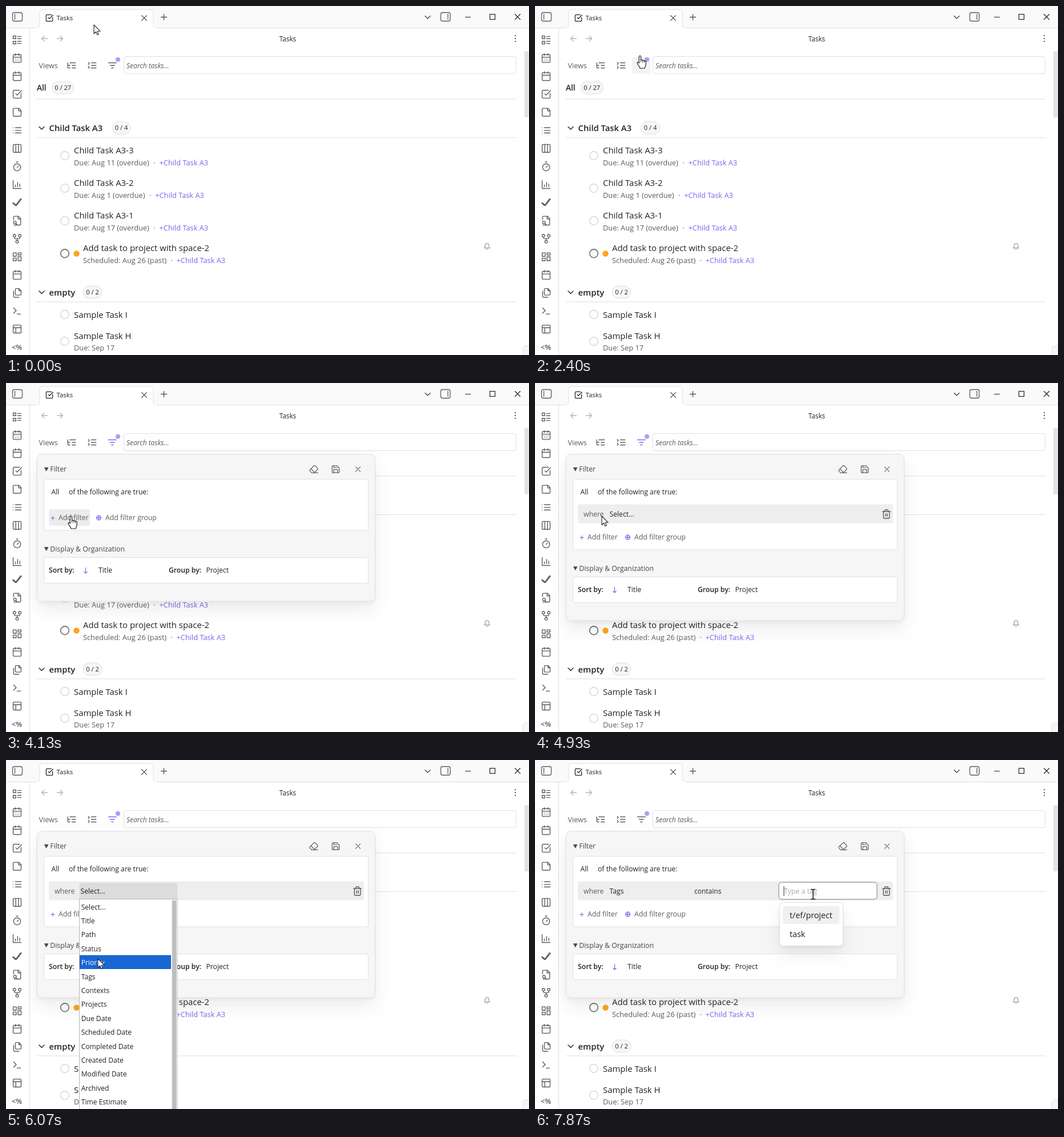
These frames come from a looping animation (916 by 611 pixels, 8000 ms). An HTML page:

```html
<!DOCTYPE html>
<html lang="en">
<head>
<meta charset="utf-8">
<title>Tasks</title>
<style>
  html, body { margin: 0; width: 100%; height: 100%; overflow: hidden; background: #fff; }
  svg { display: block; width: 100vw; height: 100vh; font-family: "Open Sans", "Noto Sans", sans-serif; }
  text { white-space: pre; }
</style>
</head>
<body>
<svg id="stage" viewBox="0 0 916 611"></svg>
<script>
const INK = '#222', SOFT = '#5c5c5c', LINE = '#e0e0e0', PURPLE = '#8560f0';

// Text placed by its left edge and the middle of its capitals
const text = (x, mid, str, size = 12.2, fill = INK, weight = 400, more = '') =>
  `<text x="${x}" y="${mid + size * .36}" font-size="${size}" fill="${fill}" font-weight="${weight}" ${more}>` +
  str.replace(/&/g, '&amp;').replace(/</g, '&lt;') + '</text>';
const rect = (x, y, w, h, r, fill, stroke = 'none', more = '') =>
  `<rect x="${x}" y="${y}" width="${w}" height="${h}" rx="${r}" fill="${fill}" stroke="${stroke}" ${more}/>`;
const disc = (x, y, r, fill, stroke = 'none', width = 1) =>
  `<circle cx="${x}" cy="${y}" r="${r}" fill="${fill}" stroke="${stroke}" stroke-width="${width}"/>`;
const path = (d, stroke, width = 1, fill = 'none') =>
  `<path d="${d}" stroke="${stroke}" stroke-width="${width}" fill="${fill}" stroke-linecap="round" stroke-linejoin="round"/>`;
const rule = (y, x = 54, end = 894) => rect(x, y, end - x, 1, 0, LINE);
const group = (id, body, more = '') => `<g id="${id}" ${more}>${body}</g>`;

// Icons live on a 24 unit grid
const box = (x, y, w, h) => `M${x} ${y}h${w}v${h}h${-w}z`;
const ring = (x, y, r) => `M${x - r} ${y}a${r} ${r} 0 1 0 ${2 * r} 0a${r} ${r} 0 1 0 ${-2 * r} 0`;
const square = 'M5 3h14a2 2 0 0 1 2 2v14a2 2 0 0 1-2 2H5a2 2 0 0 1-2-2V5a2 2 0 0 1 2-2z';
const calendar = 'M8 2v4M16 2v4M3 10h18M5 4h14a2 2 0 0 1 2 2v14a2 2 0 0 1-2 2H5a2 2 0 0 1-2-2V6a2 2 0 0 1 2-2z';
const checkbox = 'M21 10.5V19a2 2 0 0 1-2 2H5a2 2 0 0 1-2-2V5a2 2 0 0 1 2-2h12.5M9 11l3 3L22 4';
const cross = 'M5 5l14 14M19 5L5 19';
const dots = 'M12 4v.01M12 12v.01M12 20v.01';
const icon = (d, x, y, size = 18, stroke = SOFT, width = 1.8) =>
  `<g transform="translate(${x - size / 2} ${y - size / 2}) scale(${size / 24})">${path(d, stroke, width)}</g>`;

const ribbon = [
  box(3, 3, 6, 6) + box(3, 15, 6, 6) + 'M13 4h8M13 9h8M13 15h8M13 20h8',
  calendar + 'M8 14h.01M12 14h.01M16 14h.01M8 18h.01M12 18h.01M16 18h.01',
  calendar,
  checkbox,
  'M16 3H5a2 2 0 0 0-2 2v14a2 2 0 0 0 2 2h14a2 2 0 0 0 2-2V8zM15 3v4a2 2 0 0 0 2 2h4',
  'M3 6h.01M3 12h.01M3 18h.01M8 6h13M8 12h13M8 18h13',
  square + 'M9 3v18M15 3v18',
  'M10 2h4M12 14l3-3' + ring(12, 14, 8),
  'M3 3v18h18M8 17v-4M13 17V7M18 17v-6',
  'M2 13l6 6L20 3M3 12l6 5M10 19L22 4',
  'M14 2v6h6M5 22h13a2 2 0 0 0 2-2V7l-5-5H6a2 2 0 0 0-2 2v6M9 18l3 3' + ring(7, 16, 3),
  ring(12, 19, 3) + ring(6, 5, 3) + ring(18, 5, 3) + 'M18 8v2c0 1-1 2-2 2H8c-1 0-2-1-2-2V8M12 12v4',
  box(3, 3, 7, 8) + box(14, 3, 7, 5) + box(14, 12, 7, 9) + box(3, 15, 7, 6),
  calendar,
  'M10 2h6l5 5v8a2 2 0 0 1-2 2h-9a2 2 0 0 1-2-2V4a2 2 0 0 1 2-2zM16 2v5h5M16 22H6a2 2 0 0 1-2-2V8',
  'M4 17l6-6-6-6M12 19h8',
  square + 'M3 9h18M9 21V9'
];

const pill = (x, y, w, label) =>
  rect(x + .5, y + .5, w - 1, 22, 11, '#f6f6f6', LINE) +
  text(x + w / 2, y + 11.5, label, 11.1, INK, 500, 'text-anchor="middle"');
const heading = (y, label, pillX, count) =>
  path(`M58 ${y - 2.5}l4.5 4.5 4.5-4.5`, INK, 1.4) +
  text(75.5, y, label, 14.8, INK, 600) + pill(pillX, y - 12, 34, count) + rule(y + 16);
const task = (y, title, sub, sepX, x = 119) =>
  text(x, y, title, 14.9) + text(x, y + 21, sub, 12.8, SOFT) +
  (sepX ? disc(sepX, y + 21.5, 1.3, '#bbb') + text(sepX + 8.5, y + 21, '+Child Task A3', 12.8, PURPLE) : '');
const bubble = (y, stroke = '#dedede') => disc(103, y, 7.3, '#fff', stroke, 1.8);

const frame =
  rect(0, 0, 916, 38.5, 0, '#fafafa') + rule(38, 0, 916) + rect(41, 39, 1, 572, 0, LINE) +
  path('M53 38.5q6 0 6-6V12q0-6 6-6h187q6 0 6 6v20.5q0 6 6 6', LINE, 1, '#fff') + rect(53, 38, 211, 1.5, 0, '#fff') +
  rect(11.5, 11.5, 17, 15, 3, 'none', SOFT, 'stroke-width="1.3"') + path('M15.5 14.5v9', SOFT, 1.3) +
  rect(761.5, 11.5, 16.5, 15, 3, 'none', SOFT, 'stroke-width="1.3"') + path('M774 14.5v9', SOFT, 1.3) +
  icon(checkbox, 76, 21, 15, INK, 2) + text(88.5, 21, 'Tasks', 11.4, INK) +
  icon(cross, 242, 21, 15, '#444', 2) + path('M271.5 19.5h10M276.5 14.5v10', '#555', 1.3) +
  path('M734 17.5l4.5 4.5 4.5-4.5', '#444', 1.3) + path('M804.5 19.5h9', INK, 1.2) +
  rect(847.5, 14.5, 9, 9, 0, 'none', INK, 'stroke-width="1.2"') + path('M891.5 14.5l9 9M900.5 14.5l-9 9', INK, 1.2) +
  ribbon.map((d, i) => icon(d, 19.5, 59.5 + i * 31.63, 18.5)).join('') +
  text(10, 597.5, '<%', 12.5, '#555', 600) +
  path('M72.5 57h-10M67 52.5L62.5 57l4.5 4.5M89.5 57h10M95 52.5l4.5 4.5-4.5 4.5', '#b5b5b5', 1.3) +
  text(493.5, 57.5, 'Tasks', 11.7, INK, 400, 'text-anchor="middle"') + icon(dots, 892, 57, 15, '#333', 3.4) +
  text(57.5, 104.5, 'Views', 12.6, SOFT, 500) +
  icon('M21 12h-8M21 6H8M21 18h-8M3 6v10c0 1 1 2 2 2h3M3 10c0 1 1 2 2 2h3', 115, 104) +
  group('list', icon('M3 10l2.5-2.5L3 5M3 19l2.5-2.5L3 14M10 6h11M10 12h11M10 18h11', 151, 104, 18, 'currentColor')) +
  rect(170, 89, 32, 29.5, 4, '#f4f4f4', 'none', 'id="filterBack"') +
  group('filter', icon('M3 6h18M7 12h10M10 18h4', 186.3, 104, 18, 'currentColor', 2)) +
  disc(196, 93.7, 4, '#b598f6') +
  rect(206.5, 88.5, 687, 30, 4, '#fff', LINE) +
  text(211, 104.5, 'Search tasks...', 12, SOFT, 400, 'font-style="italic"') +
  text(54, 143.5, 'All', 13.7, INK, 600) + pill(80, 131.5, 39.5, '0 / 27') + rule(162.5);

const tasks =
  heading(214, 'Child Task A3', 185, '0 / 4') +
  bubble(262) + task(253, 'Child Task A3-3', 'Due: Aug 11 (overdue)', 260) +
  bubble(319) + task(310, 'Child Task A3-2', 'Due: Aug 1 (overdue)', 252.7) +
  bubble(376) + task(367, 'Child Task A3-1', 'Due: Aug 17 (overdue)', 260) +
  bubble(433.3, '#777') + disc(123.5, 433.5, 5.2, '#ffa41f') +
  task(424, 'Add task to project with space-2', 'Scheduled: Aug 26 (past)', 290, 135) +
  icon('M6 8a6 6 0 0 1 12 0c0 7 3 9 3 9H3s3-2 3-9M10 21c1 1.3 3 1.3 4 0', 842.5, 421, 13, '#777') +
  group('menu', icon(dots, 878, 0, 14, '#888', 2.4)) +
  heading(501.5, 'empty', 134.5, '0 / 2') +
  bubble(540) + task(540.5, 'Sample Task I', '') +
  bubble(587) + task(577.5, 'Sample Task H', 'Due: Sep 17') +
  rect(908, 79, 7.5, 116, 2, '#e2e2e2') +
  path('M905.5 612v-11q0-6 6-6h6v17z', LINE, 1, '#f6f6f6');

const fold = (y, label) => path(`M67.5 ${y - 3}h6.5l-3.25 6z`, '#444', .6, '#444') + text(77.3, y, label, 12.3, '#444', 500);
const lower =
  rect(75, 221, 72, 29, 4, '#ececec', 'none', 'id="addBack"') +
  path('M79 236.5h6M82 233.5v6', PURPLE, 1.2) + text(92, 236, 'Add filter', 12.3, SOFT) +
  path(ring(162.5, 236, 3.9) + 'M159 236h7M162.5 232.5v7', PURPLE, 1.3) + text(174, 236, 'Add filter group', 12.3, SOFT) +
  fold(290.5, 'Display & Organization') +
  rect(66.5, 305.5, 568, 45, 4, '#fff', LINE) +
  text(75, 328, 'Sort by:', 12.2, INK, 600) +
  path('M139.5 323.5v9.5M136.8 330.3l2.7 2.7 2.7-2.7', PURPLE, 1.2) + text(162, 328, 'Title') +
  text(285, 328, 'Group by:', 12.2, INK, 600) + text(350.5, 328, 'Project');

const condition =
  rect(75, 212.5, 552, 33, 3, '#eee', 'none', 'id="rowBack"') +
  rect(128.5, 215, 172, 30, 4, '#dcdcdc', 'none', 'id="selectBack"') +
  text(85, 229.5, 'where', 12.15, SOFT) +
  group('unset', text(130.5, 229.5, 'Select...', 12.2)) + group('tags', text(130.5, 229.5, 'Tags', 12.2)) +
  group('value',
    text(279, 229.5, 'contains', 12) +
    rect(427.5, 214.5, 171, 29, 4, '#fff', '#dadada') +
    rect(427, 214, 172, 30, 5, '#fff', '#b8b8b8', 'id="focus" stroke-width="2"') +
    text(436, 230, 'Type a tag', 12.3, '#aaa') + rect(435.5, 221, 1, 17, 0, INK, 'none', 'id="caret"')) +
  icon('M3 6h18M19 6v14a2 2 0 0 1-2 2H7a2 2 0 0 1-2-2V6M8 6V4c0-1 1-2 2-2h4c1 0 2 1 2 2v2M10 11v6M14 11v6', 615.5, 229.5, 18, '#555');

const panel =
  rect(54.5, 124.5, 592, 257.5, 8, '#f6f6f6', LINE, 'id="sheet" filter="url(#shade)"') +
  fold(151, 'Filter') +
  icon('M7 21l-4.3-4.3c-1-1-1-2.4 0-3.4l9.6-9.6c1-1 2.4-1 3.4 0l5.6 5.6c1 1 1 2.4 0 3.4L13 21M22 21H7M5 11l9 9', 539, 151, 17) +
  icon('M15 3l6 6v10a2 2 0 0 1-2 2H5a2 2 0 0 1-2-2V5a2 2 0 0 1 2-2zM17 21v-8H7v8M7 3v5h8', 577.5, 151, 16.5) +
  icon(cross, 616.5, 151, 14) +
  rect(66.5, 168.5, 568, 89.5, 4, '#fff', LINE, 'id="card"') +
  text(79.5, 190.5, 'All') + text(110, 190.5, 'of the following are true:') +
  group('condition', condition) + group('lower', lower);

const fields = ['Select...', 'Title', 'Path', 'Status', 'Priority', 'Tags', 'Contexts', 'Projects', 'Due Date',
  'Scheduled Date', 'Completed Date', 'Created Date', 'Modified Date', 'Archived', 'Time Estimate'];
const TOP = 244, STEP = 24.4;
const menu =
  rect(128.5, 243.5, 171.5, 380, 0, '#fff', '#b5b5b5') + rect(289.5, 244, 10, 367, 0, '#f3f3f3') +
  rect(291, 246, 7.5, 370, 0, '#bdbdbd') +
  rect(129, TOP, 160, STEP, 0, '#1967d2', 'none', 'id="pick"') +
  fields.map((name, i) => text(131.7, 257.3 + i * STEP, name, 12.1, INK, 400, 'class="field"')).join('');

const hints =
  rect(428.5, 249.5, 111, 76, 7, '#fff', LINE, 'filter="url(#shade)"') +
  rect(434, 256, 99, 31, 4, '#f0f0f0') + text(446, 272, 't/ef/project', 14.3) + text(446, 304.5, 'task', 14.3);

const pointers =
  group('arrow', path('M0 0V15.5L3.6 12.2 6 17.6 8.4 16.6 6 11.2H11z', INK, 1.1, '#fff')) +
  group('hand', path('M-1.7 12V1.6a1.6 1.6 0 0 1 3.2 0V8c.5-1 3-.8 3.2.5c.6-.8 2.9-.5 3 .8c.8-.6 2.5-.2 2.5 1.4V15c0 3-1.5 4-2 7H0c-.6-2.5-2-4-4-7c-1-1.6-1.5-2.5-.6-3.3c1-.8 2.2.2 2.9 1.3z', INK, 1.2, '#fff') +
    path('M1.5 8v3M4.7 8.5v3M7.7 9.3v2.5', INK)) +
  group('beam', path('M-3.5-8.5h2.5l1 1 1-1h2.5M0-7.5v15M-3.5 8.5h2.5l1-1 1 1h2.5', INK, 1.6));

const shadow = (dy, blur, alpha) => `<feDropShadow dx="0" dy="${dy}" stdDeviation="${blur / 2}" flood-opacity="${alpha}"/>`;
document.getElementById('stage').innerHTML =
  '<defs><filter id="shade" x="-50%" y="-50%" width="200%" height="220%">' +
  shadow(1, 2, .028) + shadow(3.4, 6.7, .042) + shadow(15, 30, .07) + '</filter></defs>' +
  frame + tasks + group('panel', panel) + group('menuList', menu) + group('hints', hints) + group('pointer', pointers);

const el = {};
document.querySelectorAll('#stage [id]').forEach(node => el[node.id] = node);
const options = document.querySelectorAll('.field');
const show = (id, on) => el[id].style.display = on ? '' : 'none';
const within = (v, a, b) => v >= a && v < b;
const inside = (p, x, y, w, h) => within(p.x, x, x + w) && within(p.y, y, y + h);

// Pointer stops: time, x, y
const stops = [
  [0, 154, 33], [867, 156, 94], [1200, 186, 117], [1333, 186, 117], [1400, 197, 173], [1733, 126, 428],
  [1800, 126, 428], [2400, 184, 87], [2533, 184, 87], [2667, 184, 98], [3333, 184, 98], [4133, 114, 233],
  [4867, 114, 233], [5267, 159, 233], [5600, 159, 233], [6267, 161, 380], [6867, 161, 380], [7667, 487, 235], [8000, 487, 235]
];
function pointerAt(t) {
  const i = Math.max(1, stops.findIndex(s => s[0] >= t));
  const [t0, x0, y0] = stops[i - 1], [t1, x1, y1] = stops[i];
  const u = (t - t0) / (t1 - t0), e = u * u * (3 - 2 * u);
  return { x: Math.round(x0 + (x1 - x0) * e), y: Math.round(y0 + (y1 - y0) * e) };
}

function draw(ms) {
  const tick = 200 / 3;
  const t = Math.floor((ms % 8000 + 3.4) / tick) * tick;
  const p = pointerAt(Math.min(t, 7999));
  const added = t > 4190, chosen = t > 6590, ready = t > 6660;

  // Toolbar and list
  const overFilter = within(t, 920, 1460) || within(t, 2260, 3520);
  show('filterBack', overFilter);
  el.filter.style.color = within(t, 2860, 6660) ? PURPLE : overFilter ? INK : SOFT;
  el.list.style.color = within(t, 790, 920) ? INK : SOFT;
  show('menu', t < 2400 && within(p.y, 239, 456));
  el.menu.setAttribute('transform', `translate(0 ${250 + Math.floor((p.y - 239) / 57) * 57})`);

  // Filter panel
  const grow = added ? 34 : 0;
  show('panel', t > 2860);
  el.panel.style.opacity = Math.min(1, (t - 2800) / 333);
  el.sheet.setAttribute('height', 257.5 + grow);
  el.card.setAttribute('height', 89.5 + grow);
  el.lower.setAttribute('transform', `translate(0 ${grow})`);
  const overAdd = !added && t > 3400 && inside(p, 75, 221, 72, 29);
  show('addBack', overAdd);
  show('condition', added);
  show('rowBack', within(t, 4260, 6660) || ready && within(p.y, 212, 246));
  show('selectBack', p.x > 129 && t < 6590);
  show('unset', !chosen);
  show('tags', chosen);
  show('value', ready);
  show('focus', t > 7790);
  show('caret', t > 7790);
  show('hints', t > 7860);

  // Field list
  const index = Math.max(0, Math.floor((p.y - TOP) / STEP));
  show('menuList', t > 5390 && !chosen);
  el.pick.setAttribute('y', TOP + index * STEP);
  options.forEach((o, i) => o.setAttribute('fill', i === index ? '#fff' : INK));

  const hand = overAdd || inside(p, 135, 87, 67, 32);
  const beam = ready && inside(p, 427, 214, 172, 30);
  show('hand', hand);
  show('beam', beam);
  show('arrow', !hand && !beam);
  el.pointer.setAttribute('transform', `translate(${p.x} ${p.y})`);
}

const start = performance.now();
function loop() {
  draw(performance.now() - start);
  requestAnimationFrame(loop);
}
loop();
</script>
</body>
</html>
```
